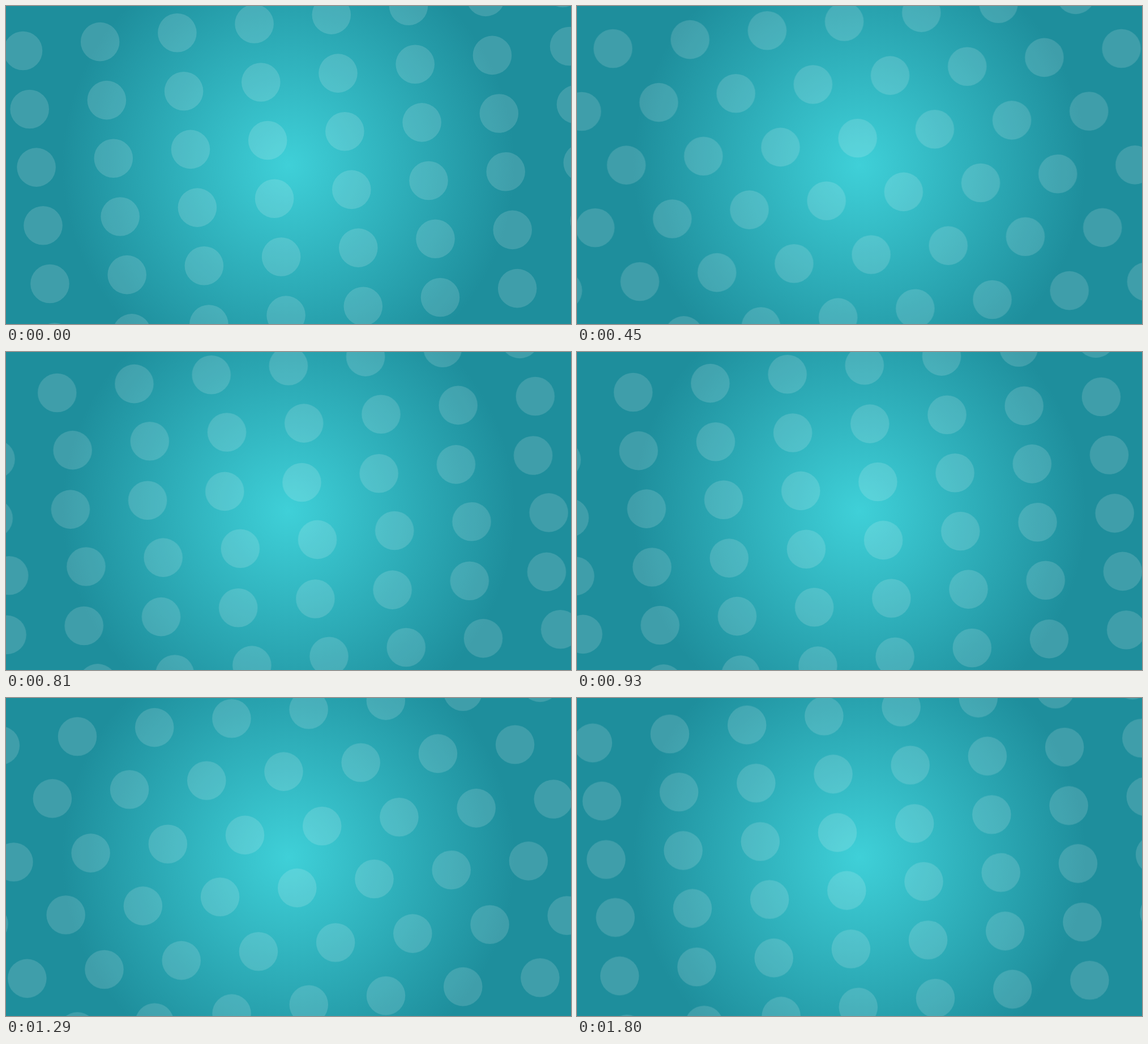
An HTML page without scripts that plays this animation: 998x561 px, repeating every 1.83 s.

```html
<!DOCTYPE html>
<html lang="en">
<head>
<meta charset="utf-8">
<title>Sliding dots</title>
<style>
  html, body {
    margin: 0;
    width: 100%;
    height: 100%;
    overflow: hidden;
  }
  body {
    background: radial-gradient(circle 400px at 499px 280.5px, #3fd0d8, #1e8e9c);
  }
  svg {
    display: block;
    width: 998px;
    height: 561px;
  }
  /* Zero-length dashes with round caps draw each row of dots */
  #row {
    fill: none;
    stroke: #fff;
    stroke-opacity: .15;
    stroke-width: 68.6px;
    stroke-linecap: round;
    stroke-dasharray: 0 1;
  }
  .right, .left {
    animation: slide 1830ms steps(61) -1ms infinite;
  }
  .right { --dx: 136.2px; --dy: -15.85px; }
  .left { --dx: -136.2px; --dy: 15.85px; }
  @keyframes slide {
    from { transform: translate(0, 0); }
    to { transform: translate(var(--dx), var(--dy)); }
  }
</style>
</head>
<body>
<svg viewBox="0 0 998 561">
  <defs>
    <path id="row" pathLength="10" d="M-136.2 15.85L1225.8 -142.65"/>
  </defs>
  <g class="right">
    <use href="#row" x="30" y="79"/>
    <use href="#row" x="53.6" y="284.6"/>
    <use href="#row" x="77.5" y="490"/>
  </g>
  <g class="left">
    <use href="#row" x="41.7" y="182"/>
    <use href="#row" x="65.5" y="387.3"/>
    <use href="#row" x="86" y="593.2"/>
  </g>
</svg>
</body>
</html>
```
